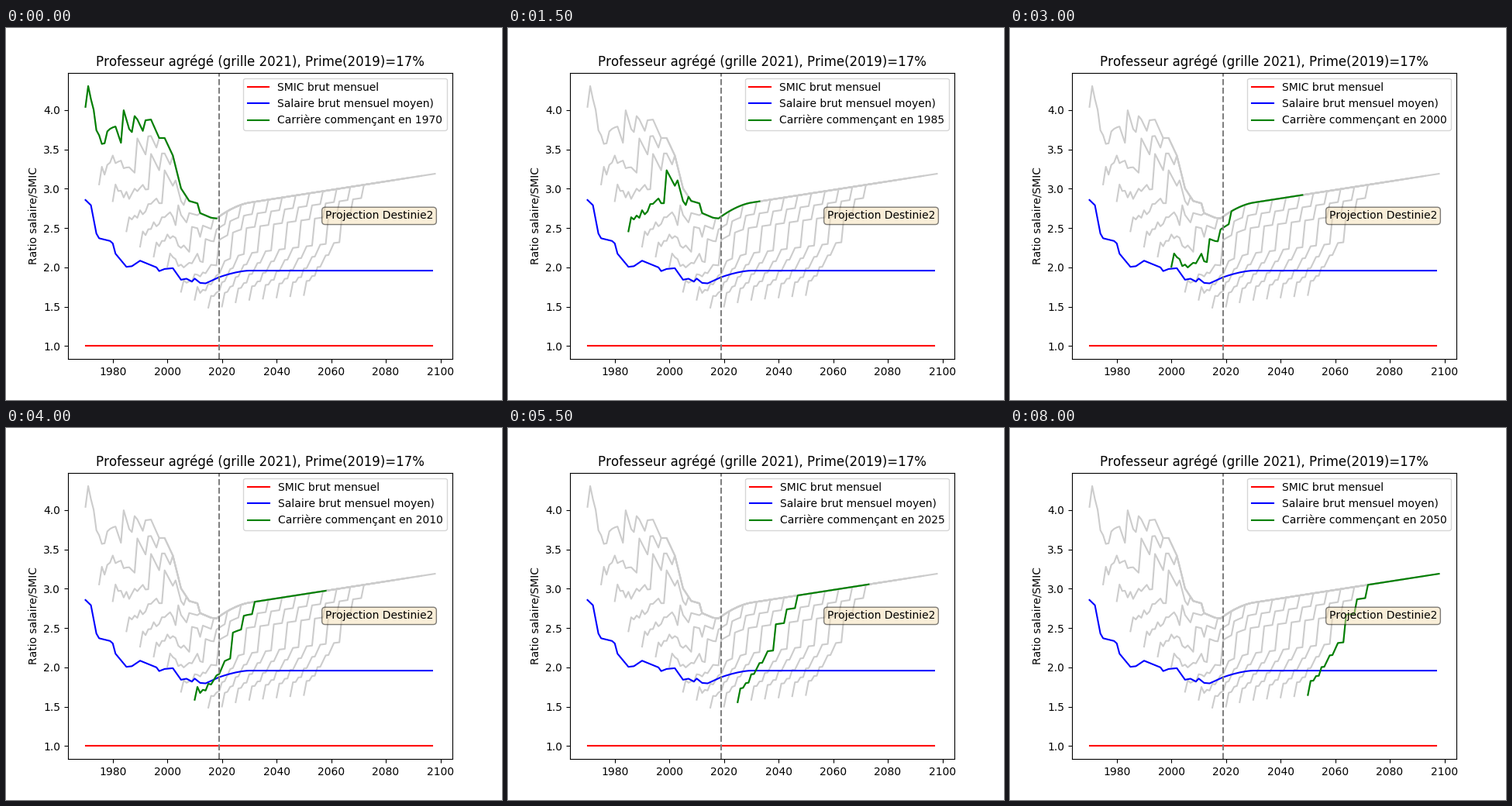
These frames come from a looping animation (640x480 px, 8.5 s). A matplotlib script:

```python
import numpy as np
import matplotlib.pyplot as plt
from matplotlib.animation import FuncAnimation

plt.rcParams["font.family"] = "DejaVu Sans"
plt.rcParams["text.kerning_factor"] = 6

STARTS = range(1970, 2051, 5)
SPAN = 49

# Pay-scale steps and the half-years spent on each, averaged per year
STEPS = [450, 498, 513, 542, 579, 618, 710, 757, 800]
HALF_YEARS = [2, 4, 4, 5, 6, 7, 8, 8, 54]
SCALE = np.repeat(STEPS, HALF_YEARS).reshape(SPAN, 2).mean(axis=1) / STEPS[0]

# Turning points of the entry salary and of the mean salary, in SMIC
ENTRY = {1970: 4.04, 1972: 3.74, 1975: 3.055, 1977: 2.872, 1979: 2.923,
         1981: 2.76, 1986: 2.383, 1989: 2.307, 1992: 2.177, 1994: 2.182,
         1997: 2.05, 1999: 2.05, 2002: 1.925, 2005: 1.69, 2008: 1.60,
         2011: 1.583, 2012: 1.513, 2016: 1.48, 2018: 1.475}
MEAN = {1970: 2.857, 1972: 2.79, 1974: 2.43, 1975: 2.37, 1979: 2.336,
        1980: 2.305, 1981: 2.174, 1985: 2.007, 1987: 2.015, 1990: 2.085,
        1996: 2.0, 1997: 1.953, 1999: 1.98, 2002: 1.99, 2005: 1.843,
        2007: 1.856, 2009: 1.82, 2010: 1.858, 2012: 1.803, 2014: 1.797,
        2019: 1.876}


def follow(points, years):
    return np.interp(years, list(points), list(points.values()))


def ease_out(years, begin, end, power):
    """Falls from 1 at begin to 0 at end."""
    return np.clip((end - years) / (end - begin), 0, 1) ** power


def entry_salary(years):
    top = 2.823 + 0.0054 * (years - 2030) - 0.136 * ease_out(years, 2018, 2030, 1.8)
    return np.where(years <= 2018, follow(ENTRY, years), top / SCALE[-1])


def mean_salary(years):
    projected = 1.959 - 0.083 * ease_out(years, 2019, 2030, 1.6)
    return np.where(years <= 2019, follow(MEAN, years), projected)


def career(start):
    years = start + np.arange(SPAN)
    return years, SCALE * entry_salary(years)


fig, ax = plt.subplots(figsize=(6.4, 4.8), dpi=100)
ax.set_xlim(1963.6, 2104.4)
ax.set_ylim(0.8345, 4.4755)
ax.set_title("Professeur agrégé (grille 2021), Prime(2019)=17%")
ax.set_ylabel("Ratio salaire/SMIC")

for start in STARTS:
    ax.plot(*career(start), color="0.8")

years = np.arange(1970, 2098)
ax.plot(years, np.ones(len(years)), color="red", label="SMIC brut mensuel")
ax.plot(years, mean_salary(years), color="blue",
        label="Salaire brut mensuel moyen)")
current, = ax.plot(*career(1970), color="green",
                   label="Carrière commençant en 1970")
ax.axvline(2019, color="grey", linestyle="--")
ax.text(0.95, 0.5, "Projection Destinie2", transform=ax.transAxes,
        ha="right", va="center",
        bbox=dict(boxstyle="round", facecolor="wheat", alpha=0.5))

legend = ax.legend(loc="upper right")
career_label = legend.get_texts()[2]


def update(i):
    start = STARTS[i]
    current.set_data(*career(start))
    career_label.set_text(f"Carrière commençant en {start}")
    return current, career_label


anim = FuncAnimation(fig, update, frames=len(STARTS), interval=500,
                     repeat=True, repeat_delay=0)
plt.show()
```
